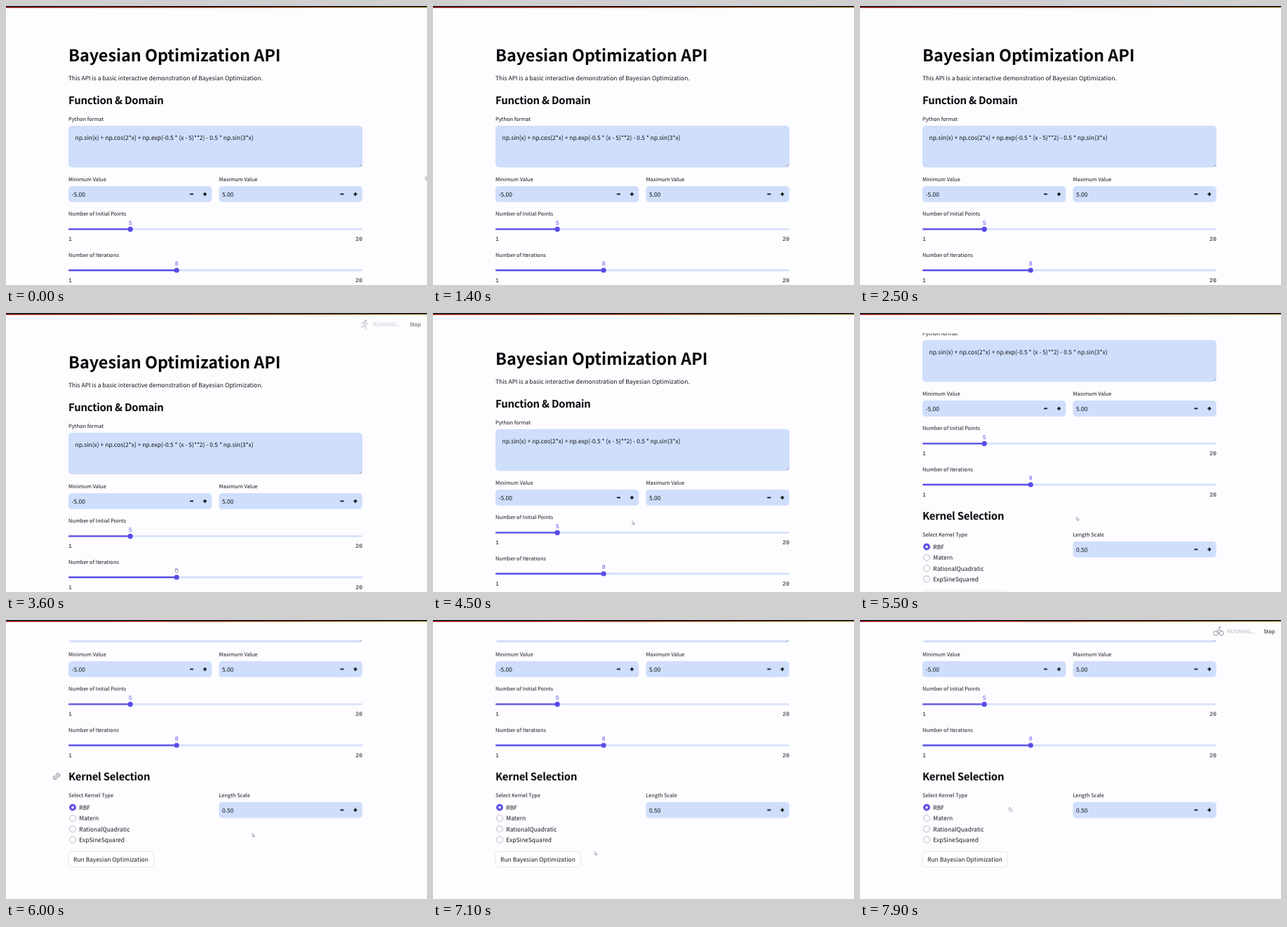
An HTML page that plays this animation: 600x398 px, repeating every 8 s.

```html
<!DOCTYPE html>
<html lang="en">
<head>
<meta charset="utf-8">
<title>Bayesian Optimization API</title>
<style>
  :root { --bg: #fdfcff; --field: #cfdefb; --accent: #584be6; --ink: #14141a; }
  html, body { margin: 0; width: 100%; height: 100%; overflow: hidden; background: var(--bg); }
  svg { display: block; }
  text {
    font: 8.5px "Noto Sans CJK JP", "Noto Sans CJK SC", "Noto Sans CJK", "Open Sans", sans-serif;
    fill: var(--ink); text-rendering: geometricPrecision; white-space: pre;
  }
  .h1 { font-size: 23.45px; font-weight: 700; letter-spacing: -.003em; fill: #08080c; }
  .h2 { font-size: 14.9px; font-weight: 600; letter-spacing: -.016em; fill: #08080c; }
  .label { font-size: 7.46px; }
  .mono { font: 8.33px "Liberation Mono", "DejaVu Sans Mono", monospace; }
  .value { fill: var(--accent); text-anchor: middle; }
  .end { text-anchor: end; }
  .field { fill: var(--field); }
  .icon { fill: none; stroke: #0c0c12; stroke-width: 1.7; }
  .ring { fill: var(--bg); stroke: #b9b9c2; stroke-width: 1; }
  .sport { fill: none; stroke: #a9a9b0; stroke-width: 1.1; stroke-linecap: round; stroke-linejoin: round; }
  .pointer path { fill: #fff; stroke: #8c8c9c; stroke-width: .7; stroke-linejoin: round; }

  .page, .status, .pointer, .arrow, .hand, .runner, .bike, .link, .button rect, .button text {
    animation: 8s linear infinite;
  }
  .page { animation-name: scroll; }
  .pointer { animation-name: move; }
  .status { animation-name: status; }
  .link { animation-name: link; animation-timing-function: step-end; }
  .arrow { animation-name: arrow; animation-timing-function: step-end; }
  .hand { animation-name: hand; animation-timing-function: step-end; }
  .runner { animation-name: runner; animation-timing-function: step-end; }
  .bike { animation-name: bike; animation-timing-function: step-end; }
  .button rect { fill: #fffeff; stroke: #dcdce2; stroke-width: .7; animation-name: border; animation-timing-function: step-end; }
  .button text { animation-name: caption; animation-timing-function: step-end; }

  @keyframes scroll {
    0%, 55% { transform: translateY(0); }
    56.25% { transform: translateY(-5px); }
    60% { transform: translateY(-37px); }
    63.75% { transform: translateY(-75.3px); }
    67.5% { transform: translateY(-114px); }
    71.25% { transform: translateY(-168px); }
    73.75%, 100% { transform: translateY(-198.3px); }
  }
  @keyframes move {
    0%, 1.2% { transform: translate(597.5px, 243px); }
    3.7%, 36% { transform: translate(606px, 243px); }
    36.01% { transform: translate(318px, 340px); }
    42.5%, 47% { transform: translate(241px, 364px); }
    52% { transform: translate(282px, 304px); }
    56.25% { transform: translate(284px, 296.5px); }
    63.75% { transform: translate(287.5px, 286.5px); }
    67.5% { transform: translate(300px, 288px); }
    75%, 80% { transform: translate(351px, 304px); }
    87.5% { transform: translate(255px, 325px); }
    91.2%, 95% { transform: translate(183px, 340px); }
    98.75%, 99.98% { transform: translate(212.5px, 267px); }
    100% { transform: translate(597.5px, 243px); }
  }
  @keyframes status {
    0%, 43.5% { opacity: 0; }
    45% { opacity: .75; }
    46.25%, 51% { opacity: 1; }
    53%, 94.5% { opacity: 0; }
    97%, 99.98% { opacity: 1; }
    100% { opacity: 0; }
  }
  @keyframes link { 0% { opacity: 0; } 70% { opacity: 1; } 76.2%, 100% { opacity: 0; } }
  @keyframes arrow { 0% { opacity: 1; } 42.5% { opacity: 0; } 47.5% { opacity: 1; } 91.2%, 100% { opacity: 0; } }
  @keyframes hand { 0% { opacity: 0; } 42.5% { opacity: 1; } 47.5% { opacity: 0; } 91.2%, 100% { opacity: 1; } }
  @keyframes runner { 0% { opacity: 1; } 60%, 100% { opacity: 0; } }
  @keyframes bike { 0% { opacity: 0; } 60%, 100% { opacity: 1; } }
  @keyframes border { 0% { stroke: #dcdce2; } 91.2% { stroke: var(--accent); } 96.2%, 100% { stroke: #dcdce2; } }
  @keyframes caption { 0% { fill: var(--ink); } 91.2% { fill: var(--accent); } 96.2%, 100% { fill: var(--ink); } }
</style>
</head>
<body>
<svg width="600" height="398" viewBox="0 0 600 398">
  <defs>
    <linearGradient id="stripe">
      <stop offset="0" stop-color="#f0443f"/>
      <stop offset=".5" stop-color="#f5793f"/>
      <stop offset="1" stop-color="#f8dc78"/>
    </linearGradient>
    <g id="number">
      <rect class="field" width="204.4" height="22.8" rx="4.8"/>
      <path class="icon" d="M173 11.4h5M192 11.4h5M194.5 8.9v5"/>
    </g>
    <g id="track">
      <rect class="field" y="-1.2" width="419" height="2.4" rx="1.2"/>
      <text class="mono" y="16.7">1</text>
      <text class="mono end" x="419" y="16.7">20</text>
    </g>
    <circle id="radio" class="ring" r="4.5"/>
  </defs>

  <rect width="600" height="398" fill="#fdfcff"/>

  <g class="page">
    <text class="h1" x="89" y="78.9">Bayesian Optimization API</text>
    <text x="89" y="106">This API is a basic interactive demonstration of Bayesian Optimization.</text>
    <text class="h2" x="89" y="140.2">Function &amp; Domain</text>

    <text class="label" x="89" y="163.7">Python format</text>
    <rect class="field" x="89" y="170.8" width="419" height="59.4" rx="4.8"/>
    <text x="98.5" y="190.8">np.sin(x) + np.cos(2*x) + np.exp(-0.5 * (x - 5)**2) - 0.5 * np.sin(3*x)</text>
    <path d="M503.8 229l3.2-3.2M505.6 229l1.4-1.4" stroke="#77808f" stroke-width=".6"/>

    <text class="label" x="89" y="249.5">Minimum Value</text>
    <use href="#number" x="89" y="257"/>
    <text x="93.6" y="271.7">-5.00</text>
    <text class="label" x="303.4" y="249.5">Maximum Value</text>
    <use href="#number" x="303.4" y="257"/>
    <text x="308" y="271.7">5.00</text>

    <text class="label" x="89" y="299.4">Number of Initial Points</text>
    <use href="#track" x="89" y="318.4"/>
    <rect x="89" y="317.2" width="88" height="2.4" rx="1.2" fill="#584be6"/>
    <circle cx="177.2" cy="318.4" r="3.6" fill="#584be6"/>
    <text class="mono value" x="177.2" y="311.7">5</text>

    <text class="label" x="89" y="358">Number of Iterations</text>
    <use href="#track" x="89" y="377"/>
    <rect x="89" y="375.8" width="154" height="2.4" rx="1.2" fill="#584be6"/>
    <circle cx="243.2" cy="377" r="3.6" fill="#584be6"/>
    <text class="mono value" x="243.2" y="370.3">8</text>

    <g class="link">
      <path transform="translate(72 421.4) rotate(-40)" fill="none" stroke="#77777f" stroke-width="1.1" stroke-linecap="round"
        d="M-1 -2.3h-1.7a2.3 2.3 0 0 0 0 4.6h1.7M1 -2.3h1.7a2.3 2.3 0 0 1 0 4.6h-1.7M-2 0h4"/>
    </g>
    <text class="h2" x="89" y="427.3">Kernel Selection</text>
    <text class="label" x="89" y="450.8">Select Kernel Type</text>
    <circle cx="95" cy="465.6" r="4.9" fill="#584be6"/>
    <circle cx="95" cy="465.6" r="1.9" fill="#fff"/>
    <use href="#radio" x="95" y="481"/>
    <use href="#radio" x="95" y="496.3"/>
    <use href="#radio" x="95" y="511.6"/>
    <text x="104.3" y="468.9">RBF</text>
    <text x="104.3" y="484.3">Matern</text>
    <text x="104.3" y="499.6">RationalQuadratic</text>
    <text x="104.3" y="514.9">ExpSineSquared</text>

    <text class="label" x="303.4" y="450.8">Length Scale</text>
    <use href="#number" x="303.4" y="457.9"/>
    <text x="308" y="472.7">0.50</text>

    <g class="button">
      <rect x="89.2" y="528.4" width="121.2" height="22.4" rx="4.8"/>
      <text x="96" y="542.8">Run Bayesian Optimization</text>
    </g>
  </g>

  <rect width="600" height="29" fill="#fdfcff"/>
  <rect width="600" height="3" fill="url(#stripe)"/>
  <rect width="600" height="1.8" fill="#15131f"/>

  <g class="status">
    <g class="sport" transform="translate(511 16)">
      <g class="runner">
        <circle cx="1.8" cy="-5.2" r="1" fill="#a9a9b0"/>
        <path d="M-4 -.5l1.2-2.2 3.2-.6 1.6 2.2 2.6.8M.4-3.1l-1 3.8 2.2 2.1v3.6M-.8.9l-1.2 3.2-3-.6"/>
      </g>
      <g class="bike">
        <circle cx="-4.2" cy="3" r="2.9"/>
        <circle cx="4.4" cy="3" r="2.9"/>
        <circle cx="1.8" cy="-5.4" r=".9" fill="#a9a9b0"/>
        <path d="M.2 4.4V1.6l-2.4-1.8 2.6-2.9 1.8 2h2.4"/>
      </g>
    </g>
    <text class="label" x="523.6" y="18.9" style="fill:#b6b6bd">RUNNING...</text>
    <text class="label" x="575.2" y="18.9">Stop</text>
  </g>

  <g class="pointer">
    <path class="arrow" d="M0 0v5l1.2-1 .9 1.9.9-.4-.8-1.8h1.5z"/>
    <path class="hand" d="M1 0q.7 0 .7.8v1.7l2.2.5q.7.2.6 1l-.5 2.3h-2.6l-1.8-2.4q.2-.6 .8-.2V.8q0-.8 .6-.8z"/>
  </g>
</svg>
</body>
</html>
```
